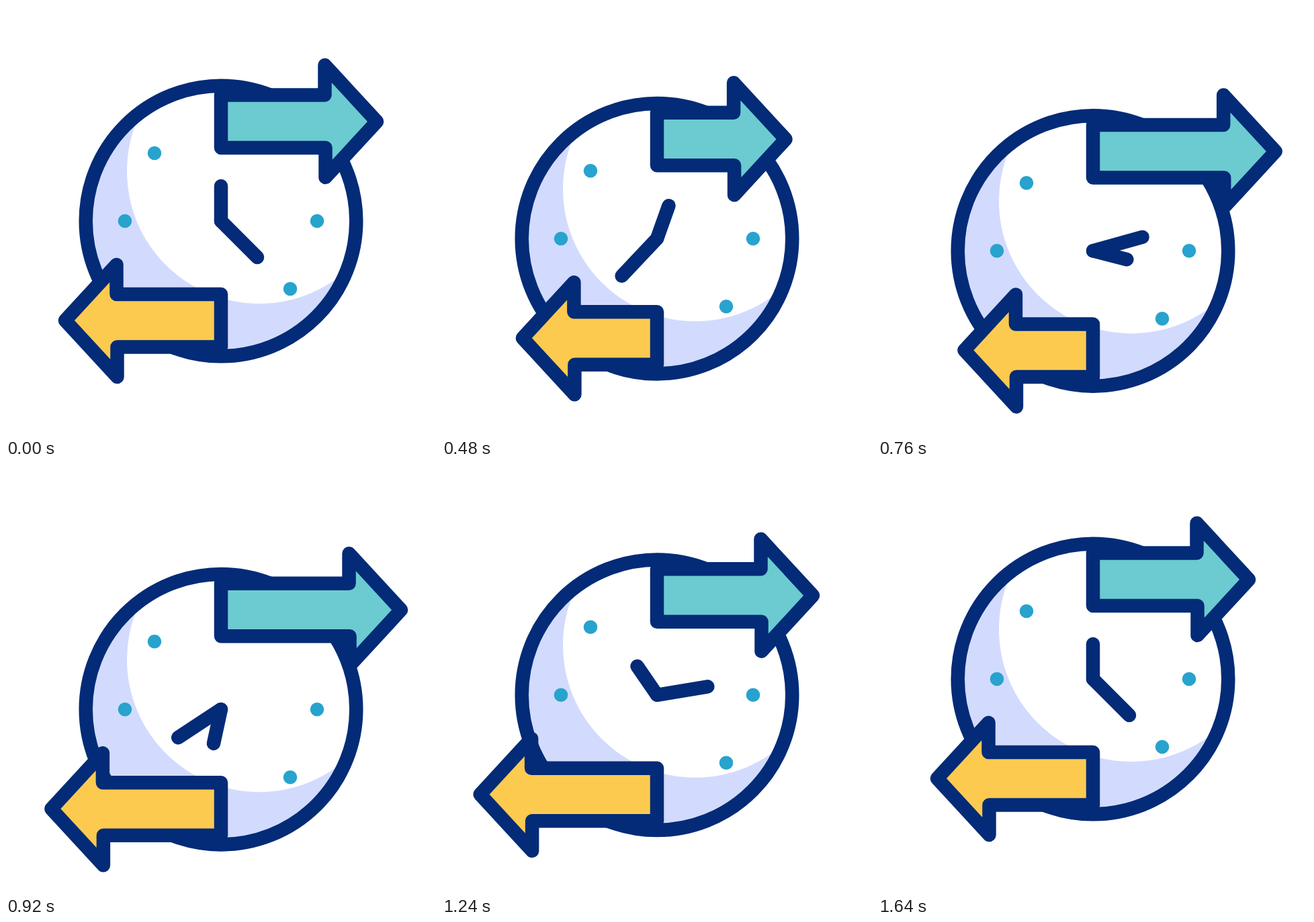
An HTML page without scripts that plays this animation: 640 by 640 pixels, repeating every 1680 ms.

```html
<!DOCTYPE html>
<html lang="en">
<head>
<meta charset="utf-8">
<title>Clock with arrows</title>
<style>
  html, body { margin: 0; height: 100%; overflow: hidden; background: #fff; }
  svg { display: block; width: 100vw; height: 100vh; }
  .line { stroke: #032b77; stroke-width: 20.5; stroke-linecap: round; stroke-linejoin: round; }
  .dots { fill: #27a3ce; }
</style>
</head>
<body>
<svg viewBox="0 0 640 640">
  <clipPath id="face"><circle cx="320" cy="320" r="201"/></clipPath>

  <g>
    <!-- whole clock dips and rises -->
    <animateTransform attributeName="transform" type="translate" dur="1.68s" repeatCount="indefinite"
      calcMode="spline" values="0 0;0 0;0 45.5;0 0;0 0" keyTimes="0;.0143;.5238;.9762;1"
      keySplines="0 0 1 1;.56 0 .44 1;.37 0 .6 1;0 0 1 1"/>

    <g clip-path="url(#face)">
      <circle cx="320" cy="320" r="201" fill="#d2dbfd"/>
      <circle cx="377" cy="246" r="197" fill="#fff"/>
    </g>
    <circle class="line" cx="320" cy="320" r="201.25" fill="none"/>

    <g class="dots">
      <circle cx="221" cy="219" r="10.3"/>
      <circle cx="177" cy="320" r="10.3"/>
      <circle cx="463" cy="320" r="10.3"/>
      <circle cx="423" cy="421" r="10.3"/>
    </g>

    <!-- short hand: one turn, long hand: two turns -->
    <path class="line" d="M320 320V268">
      <animateTransform attributeName="transform" type="rotate" dur="1.68s" repeatCount="indefinite"
        calcMode="spline" values="0 320 320;0 320 320;360 320 320;360 320 320" keyTimes="0;.119;.9524;1"
        keySplines="0 0 1 1;.56 0 .44 1;0 0 1 1"/>
    </path>
    <path class="line" d="M320 320L374 374">
      <animateTransform attributeName="transform" type="rotate" dur="1.68s" repeatCount="indefinite"
        calcMode="spline" values="0 320 320;0 320 320;720 320 320;720 320 320" keyTimes="0;.0238;.9524;1"
        keySplines="0 0 1 1;.555 0 .445 1;0 0 1 1"/>
    </path>

    <!-- arrows shorten, stretch and settle; the second follows later -->
    <path class="line" fill="#6bcbd0" d="M320 132.5H474.5V88L552 172L475.5 255V211H320Z">
      <animate attributeName="d" dur="1.68s" repeatCount="indefinite" calcMode="spline"
        values="M320 132.5H474.5V88L552 172L475.5 255V211H320Z;
                M320 132.5H424V88L501.5 172L425 255V211H320Z;
                M320 132.5H515V88L592.5 172L516 255V211H320Z;
                M320 132.5H474.5V88L552 172L475.5 255V211H320Z;
                M320 132.5H474.5V88L552 172L475.5 255V211H320Z"
        keyTimes="0;.2143;.4762;.7381;1"
        keySplines=".57 0 .43 1;.57 0 .43 1;.57 0 .43 1;0 0 1 1"/>
    </path>
    <path class="line" fill="#fdca50" transform="rotate(180 320 320)"
      d="M320 132.5H474.5V88L552 172L475.5 255V211H320Z">
      <animate attributeName="d" dur="1.68s" repeatCount="indefinite" calcMode="spline"
        values="M320 132.5H474.5V88L552 172L475.5 255V211H320Z;
                M320 132.5H474.5V88L552 172L475.5 255V211H320Z;
                M320 132.5H424V88L501.5 172L425 255V211H320Z;
                M320 132.5H515V88L592.5 172L516 255V211H320Z;
                M320 132.5H474.5V88L552 172L475.5 255V211H320Z;
                M320 132.5H474.5V88L552 172L475.5 255V211H320Z"
        keyTimes="0;.1667;.381;.6429;.9048;1"
        keySplines="0 0 1 1;.57 0 .43 1;.57 0 .43 1;.57 0 .43 1;0 0 1 1"/>
    </path>
  </g>
</svg>
</body>
</html>
```
